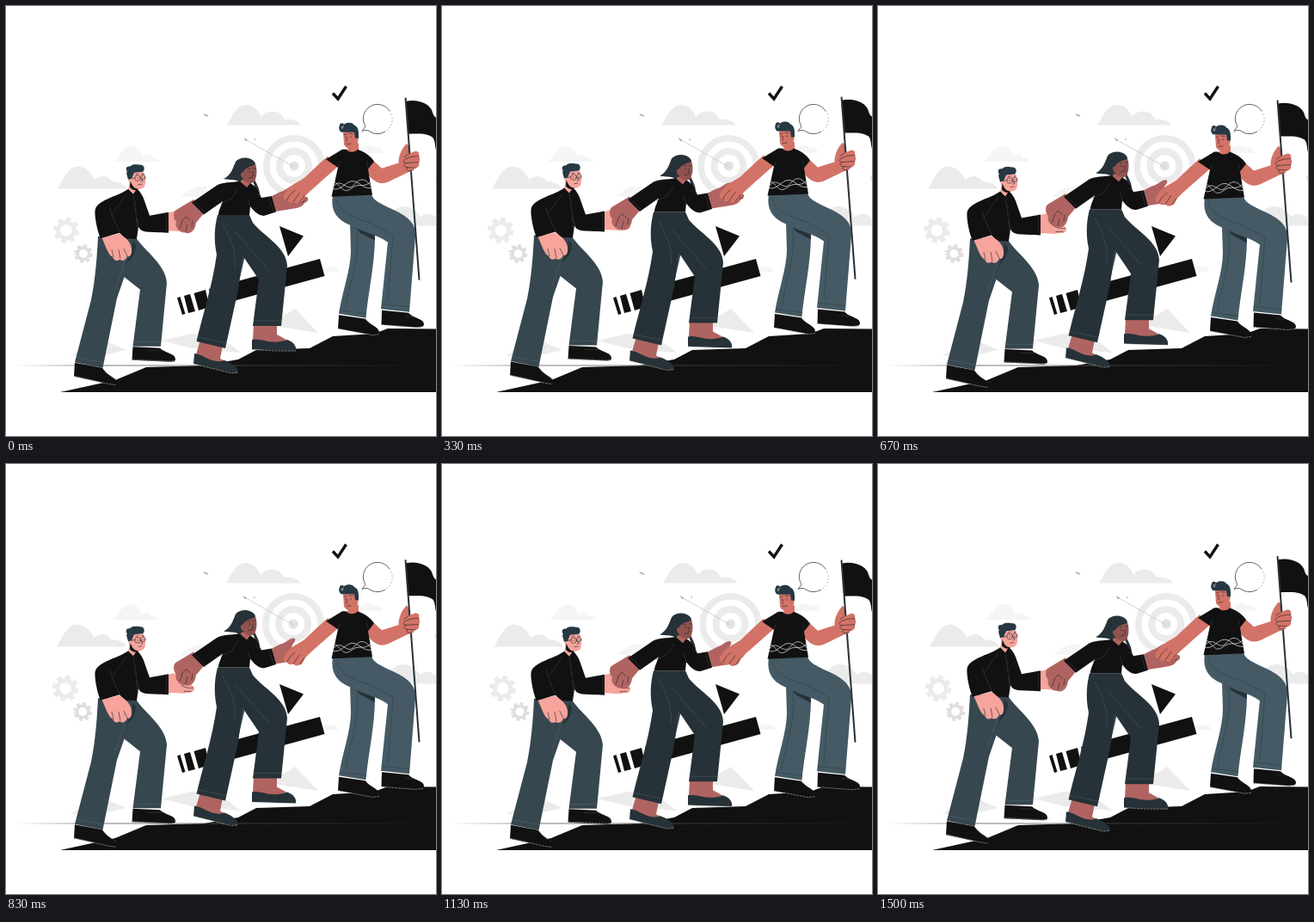
An HTML page for the animation above (1540 ms loop, 500 by 500 pixels).

```html
<!DOCTYPE html>
<html lang="en">
<head>
<meta charset="utf-8">
<title>Climbing together</title>
<style>
html, body { margin: 0; width: 100%; height: 100%; overflow: hidden; background: #fff; }
svg { display: block; width: 100vw; height: 100vh; }
.cloud { fill: #ebebeb; }
.pale { fill: #f5f5f5; }
.black { fill: #111; }
.navy { fill: #263238; }
.hair { fill: #263844; }
.slate { fill: #37474f; }
.steel { fill: #455a64; }
.pink { fill: #f6a49c; }
.brown { fill: #b06461; }
.dusk { fill: #91534f; }
.coral { fill: #d37367; }
.line { fill: none; stroke: #1c262b; stroke-width: .6; stroke-linecap: round; }
.seam { fill: none; stroke: #6d7d85; stroke-width: .4; stroke-opacity: .7; }
.fold { fill: none; stroke: #444; stroke-width: .5; }
.sole { fill: none; stroke: #ccc; stroke-width: .5; stroke-dasharray: 3 .8; }
.ring { fill: none; stroke: #ebebeb; }
</style>
</head>
<body>
<svg viewBox="0 0 500 500">
  <defs>
    <linearGradient id="fade" gradientUnits="userSpaceOnUse" x1="10" x2="500" y1="0" y2="0">
      <stop offset="0" stop-color="#777" stop-opacity="0"/>
      <stop offset=".2" stop-color="#777"/>
      <stop offset=".5" stop-color="#555" stop-opacity=".7"/>
      <stop offset="1" stop-color="#555" stop-opacity="0"/>
    </linearGradient>
  </defs>

  <g id="backdrop">
    <path class="cloud" d="M60 212.500C66 202 72 187 83 186.500C93 187 99 194 103 202C110 196 119 197 123 204C131 204 138 207 141 212.500ZM257 138.500C262 130 268 115 279 115C289 115 294 122 297 129C303 120 319 120 324 132C331 131 340 133 343 138.500ZM425 255.500C440 251 450 233 462 233C472 233 478 239 482 245C489 240 496 241 501 247V255.500ZM499 203C499 198 501 196 503 196V203Z"/>
    <path class="pale" d="M124 181C132 178 134 164 145 163C153 163 157 168 158 175C164 171 169 173 170 177C174 176 177 179 178 181ZM204 222C213 212 224 208 234 210L236 222ZM410 171C413 162 425 160 429 165C434 162 438 166 439 171ZM366 309C370 302 377 301 380 304C384 303 387 306 387 309Z"/>
    <g class="ring">
      <circle cx="70" cy="261" r="9.300" stroke-width="5"/>
      <circle cx="70" cy="261" r="13" stroke-width="4.500" pathLength="16" stroke-dasharray="1.100 .9"/>
      <g stroke="#dedede">
        <circle cx="90" cy="288" r="6.800" stroke-width="3.600"/>
        <circle cx="90" cy="288" r="9.300" stroke-width="3.400" pathLength="16" stroke-dasharray="1.100 .9"/>
      </g>
      <circle cx="335" cy="186" r="32.200" stroke-width="7.600"/>
      <circle cx="335" cy="186" r="17" stroke-width="8"/>
    </g>
    <circle cx="335" cy="186" r="5.500" fill="#e2e2e2"/>
    <path d="M278 155L335 187" fill="none" stroke="#c2c2c2" stroke-width=".7"/>
    <path d="M276 153L281 156L279 157ZM288.500 157L290 153.500L290.500 155Z" fill="#999"/>
  </g>

  <path d="M229 125.500L233 126L236 129L232 128Z" fill="#aaa"/>
  <path class="cloud" d="M74 407L112 388L140 400L118 405ZM181 389L216 381H244L273 403L216 398ZM305 371L336 352L363 380L325 374Z"/>
  <path class="black" d="M199 339.500L202.500 338L208.500 358L205 359ZM207 337L214 335L220 355L212 357ZM218.500 334L232 330L236.500 350L224 354ZM236 329L365 294L370.500 314L241 349.500ZM318 256L346 267.500L328 291Z"/>
  <path d="M380 101.500L386 108L395.500 93.500" fill="none" stroke="#111" stroke-width="3.400"/>
  <g fill="none" stroke="#222" stroke-width=".7">
    <path d="M446 122A16.500 16.500 0 0 0 418 140L414 145.500C418 144 421 144 423 146A16.500 16.500 0 0 0 441 146"/>
    <path d="M446 122A16.500 16.500 0 0 1 441 146" stroke="#777" stroke-dasharray="1.500 2.500"/>
  </g>

  <path class="black" d="M63 449L127 435L163 420L230 418L270 411L291 400L353 398L380 384L428 381L444 375L500 375.500V449Z"/>
  <path d="M10 418H500" fill="none" stroke="url(#fade)"/>

  <g class="climber">
    <path class="slate" d="M149 266C157 282 186 300 187 322L180 396H147.500L156 330L137 315Z"/>
    <path class="slate" d="M107 268L150 267C150 284 144 298 138 314L129 340L112.500 421L80 414.500L99 342C104 318 106 290 107 268Z"/>
    <path d="M139 300C145 291 147 283 147 274L151 278C151 287 147 294 139 300Z" fill="#263238"/>
    <path class="seam" d="M82 409L114 415M148 391L181 391M142 273C142 295 132 312 127 330"/>
    <path class="black" d="M80 415L112 421C117 430 129 433 129 438C129 441 126 441 122 440.500L79 431ZM147.500 396.500L179 398C185 404 197 404 197 411C197 414 194 414 190 414L146.500 412Z"/>
    <path class="sole" d="M79 430.500L118 439.500L128 441M147 411.500L190 413.500L196 413"/>
    <path class="fold" d="M112 422L120 430L129 435M165 401L182 401"/>

    <path class="pink" d="M144 204L153 209V217L148 221L142 214Z"/>
    <path class="pink" d="M145 194L160 193C163 200 162.500 206 161 210C157 215 149 214 146 208C142 206 141 200 145 200Z"/>
    <path class="black" d="M144.500 204L147 209C149 212 152 213 154 213C152 216 146 214 144 211Z"/>
    <path class="hair" d="M142 202C141 197 139 194 141 193C138 189 141 186 144 187C147 183 155 185 157 185C161 185 162 191 159 193L149 194L146 201Z"/>
    <g class="line"><circle cx="153" cy="200.500" r="3.300"/><circle cx="159.300" cy="199.500" r="2.700"/><path d="M146 201L150 200M151 196L154 195.500M158 195.500L160 195.500M157 201L159 204L157 204.500M154 208L158 207.500M153 200V201M159 199.500V200.500"/></g>
    <path class="pink" d="M187 242C196 236 206 240 211 246L218 255C221 260 216 262 211 261.500C206 264 195 261 187 262Z"/>
    <path class="line" d="M204 253C210 257 214 256 218 256M207 260L215 260"/>
    <path class="black" d="M142 213C132 221 108 225 104 236C102 241 106 262 110 270.500L132 264L138 270.500L152 271L154 257C158 264 163 263 189 264V240L167 244L160 224C157 217 154 214 152 213L148 219Z"/>
    <path class="fold" d="M140 220L123 243L132 263M123 243L121 235M148 220L152 247L153 262M152 247C153 251 154 254 155 257M187 242V262"/>
    <g fill="#555"><circle cx="150" cy="230" r=".6"/><circle cx="151" cy="239" r=".6"/><circle cx="152" cy="249" r=".6"/></g>
    <path class="pink" d="M111.500 270L132 264.500C139 270 145 274 146 282C147 289 144 293 141 291C139 297 134 297 132 295C128 298 125 295 124 292C119 290 117 282 111.500 270Z"/>
    <path class="line" d="M131 284L133 294M137 283L141 291M123 284L125 292"/>
  </g>

  <g id="middle">
    <path class="brown" d="M226 388L252 395L249 410L257 414L252 418L221 405ZM288 370H315V382L326 388L318 393L287 388Z"/>
    <path class="navy" d="M219 404C230 405 240 417 254 412C262 415 270 420 270 426C264 429 240 421 218 416ZM286 388C296 385 308 395 327 388C335 391 338 396 337 401L286 399.500Z"/>
    <path class="sole" d="M218 416L246 423L262 427L270 426M286 399.500L315 401L337 401"/>
    <path class="slate" d="M265 270L278 290L270 325L258 340Z"/>
    <path class="navy" d="M246 243H283L287 252C300 268 326 280 327 302L320 372L287 372L294 318L275 290L270 330L255 398L221.500 390C229 358 240 325 245 289C241 270 243 255 246 243Z"/>
    <path class="seam" d="M223 385L256 392M288 366L320 366M252 253C262 272 268 286 266 304M267 263L307 309"/>

    <path class="navy" d="M290 183C287 175 272 174 267 181C263 191 261 197 253 201C260 203 266 201 270 204L277 211L287 204C290 210 290 217 295 219C295 209 287 202 288 196Z"/>
    <path class="brown" d="M274 202L285 202L284 212L276 212L271 207Z"/>
    <path class="dusk" d="M275 188C279 181 288 181 290.500 185C292 191 292 198 289 204C285 208 278 205 276 201C272 198 272 192 276 193Z"/>
    <path class="navy" d="M274 194C273 184 283 179 290 184C286 187 281 186 277 191Z"/>
    <path class="line" d="M281 189.500L284 189M287 188.500L290 189M283 192V193.500M288 192V193.500M286 193L288 197L286 197.500M282 200L287 199"/>
    <path class="brown" d="M218 225L231 240L221 252C220 262 213 266 208 263.500C202 264 195 256 198 251C194 247 194 239 198 237Z"/>
    <path class="line" d="M204 251L209 245L214 249M209 262L211 254M202 259L205 251M216 257L217 250"/>
    <path class="brown" d="M309 221L319 216C325 215 330 208 335 209C339 211 333 215 332 220L350 222C353 225 350 228 347 229C345 234 338 235 332 236L313 239Z"/>
    <path class="line" d="M336 230L347 227"/>
    <path class="black" d="M272 204C260 205 253 205 246 208L216 228.500L230 242.500L252 227C250 233 247 238 247 243H283L284 233C289 240 297 246 303 243L314 239.500L309 221L297 223C293 214 290 209 284 206L280 211Z"/>
    <path class="fold" d="M270 212L262 224L249 230M284 233L281 223M297 223L291 218M219 228L232 240M306 222L311 239"/>
  </g>

  <g class="climber">
    <path class="steel" d="M400 254L429 268C429 300 421 334 418.500 363L387 358C391 332 401 306 401 285Z"/>
    <path class="navy" d="M403 254L429 264V273L412 264Z"/>
    <path class="steel" d="M380 221L425 219C427 227 436 230 448 236C466 244 477 252 476 268L469 356L436 352.500L444 275C430 265 413 263 400 255C385 249 377 238 380 221Z"/>
    <path class="line" stroke-opacity=".5" d="M389 354L419 358M437 347L469 350M408 262C412 293 398 327 395 350M384 226C389 243 411 248 425 253L450 267L444 343"/>
    <path class="black" d="M387 359.500L418 364C422 371 434 373 434 380C434 384 430 384 426 383L386 375.500ZM437 354L468 357C473 363 486 364 486 370C486 374 482 374 476 374L436.500 371Z"/>
    <path class="sole" d="M386 375.500L426 383L434 382M437 371L476 374L486 373"/>
    <path class="fold" d="M418 365L425 371M464 361L473 362"/>

    <path class="coral" d="M374 175L387 186L354 215L348 221C346 224 345 230 341 229C338 232 335 229 334 228C330 230 327 228 327 226C322 226 321 221 325 217C330 208 340 205 347 200C356 191 365 183 374 175Z"/>
    <path class="line" d="M327 226C329 220 333 217 336 215M334 228L341 218M341 229L347 221"/>
    <path class="coral" d="M398 156L410 160V168L405 172L397 169Z"/>
    <path class="coral" d="M392 147L407 145C411 150 410 160 406 164C401 168 394 165 393 161Z"/>
    <path class="hair" d="M410 154L406 154L405 147L392 147C388 148 386 142 388 139C388 136 392 136 393 138C398 134 405 137 405 139C409 140 410 145 410 149Z"/>
    <path d="M390 140L391 143L392.500 139" fill="none" stroke="#fff" stroke-width=".5"/>
    <path class="line" d="M393 150L396 149.500M399 148.500L403 149M395 152V153.500M401 152V153.500M397 153L395.500 157L397 158M396 161L401 160.500"/>
    <path class="coral" d="M419 181L426 179L437 189L459 182L471 192L444 205C434 209 427 204 420 195Z"/>
    <path class="black" d="M391 167L372 178.500L386 188L378.500 222L426 220L421 190L428 181C424 175 419 171 409 167C406 171 398 171 396 167Z"/>
    <path d="M381 210C390 199 396 217 404 209C410 202 415 198 424 209M380 204C392 210 391 220 402 212C411 205 414 213 424 205M380 213C390 216 395 203 404 204C412 205 414 213 425 212" fill="none" stroke="#eee" stroke-width=".7"/>
    <path class="fold" d="M386 188L389 180M421 188L419 180"/>

    <path class="black" d="M465 111C479 108 494 114 496 124C497 128 499 130 502 131V171C498 167 500 157 496 153C489 148 479 149 468 149Z"/>
    <path d="M464.500 107L480.500 319" fill="none" stroke="#263238" stroke-width="2"/>
    <path class="coral" d="M457 187C455 177 459 168 465 161C469 159 468 168 468.500 172L476 169C480 169 481 172 480 175C482 178 481 181 480 182C481 186 479 189 475 189C474 194 466 194 463 192Z"/>
    <path class="line" d="M468 162L468.500 172L463 176M480 175C474 175 469 176 465 178C461 180 462 183 465 183L480 182M465 183C461 185 463 188 467 188L476 188.500M467 188C464 191 467 193 472 191.500"/>
  </g>
</svg>
<script>
const PERIOD = 1540;
const backdrop = document.getElementById("backdrop");
const middle = document.getElementById("middle");
const climbers = document.querySelectorAll(".climber");

// Cosine that peaks at the given time of the loop.
const wave = (t, peak) => Math.cos(2 * Math.PI * (t - peak) / PERIOD);
const shift = (el, x, y) => el.setAttribute("transform", `translate(${x} ${y})`);

function draw(now) {
  const t = now % PERIOD;
  shift(backdrop, 1.3 * wave(t, 1270) - 0.6, 0);
  shift(middle, 0, 3.5 * wave(t, 1480) - 3.3);
  for (const el of climbers) shift(el, 0, 1.7 - 3.4 * wave(t, 230));
  requestAnimationFrame(draw);
}
draw(performance.now());
</script>
</body>
</html>
```
